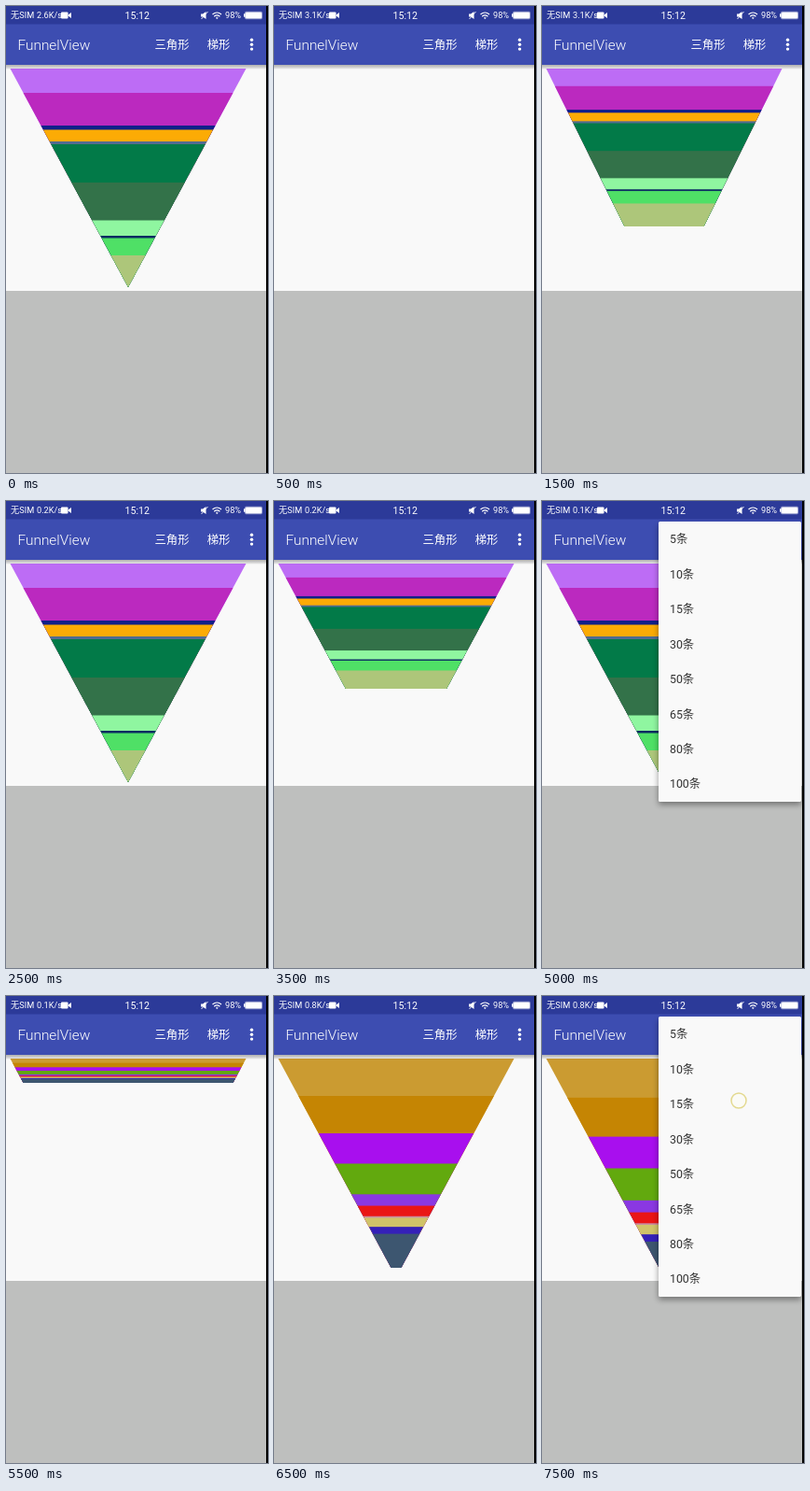
An HTML page for the animation above (8 s loop, 281x500 px).

```html
<!DOCTYPE html>
<html lang="zh">
<head>
<meta charset="utf-8">
<title>FunnelView</title>
<style>
  html, body { margin: 0; height: 100%; overflow: hidden; background: #000; }
  svg { display: block; width: 100vw; height: 100vh; }
  text { font-family: Roboto, "Noto Sans CJK SC", "Noto Sans CJK", sans-serif; font-size: 12.35px; fill: #fff; }
  .light { font-weight: 300; }
  .status text { font-size: 9.2px; }
  #popup text { fill: #333; }
</style>
</head>
<body>
<svg viewBox="0 0 281 500">
  <defs>
    <linearGradient id="fade" x2="0" y2="1">
      <stop stop-opacity=".3"/>
      <stop offset="1" stop-opacity=".06"/>
    </linearGradient>
    <filter id="blur" x="-10%" y="-10%" width="120%" height="120%"><feGaussianBlur stdDeviation="3"/></filter>
    <clipPath id="shape"><polygon id="outline"/></clipPath>
    <clipPath id="screen"><path d="M0 0H279V500H0z"/></clipPath>
  </defs>

  <g clip-path="url(#screen)">
    <path d="M0 0H279V305H0z" fill="#f9f9f9"/>
    <path d="M0 305H279V500H0z" fill="#bebfbe"/>
    <g id="bands" clip-path="url(#shape)"></g>

    <path d="M0 63H279V67.5H0z" fill="url(#fade)"/>
    <path d="M0 19H279V63H0z" fill="#3d4db1"/>
    <path d="M0 0H279V19.5H0z" fill="#2c3a99"/>

    <g class="status">
      <text x="5" y="13.3">无SIM</text>
      <text id="speed" x="33" y="13.3"></text>
      <text x="127.5" y="13.8" style="font-size:10.6px">15:12</text>
      <text x="235" y="13.3">98%</text>
      <g fill="#fff">
        <rect x="59" y="6.5" width="7.5" height="7" rx="1"/>
        <path d="M66.5 9.5L70 7V13L66.5 10.5z"/>
        <path d="M209 8.5H211L214.5 6V14L211 11.5H209z"/>
        <rect x="255" y="8.3" width="1.5" height="3.4"/>
        <rect x="257" y="6.8" width="17" height="6.4" rx=".8"/>
      </g>
      <g fill="none" stroke="#fff">
        <path d="M209.5 14L216.5 6" stroke-width=".9"/>
        <path d="M221.5 9Q226.3 5 231 9M223.2 11.2Q226.3 8.6 229.4 11.2" stroke-width="1.2"/>
        <circle cx="226.3" cy="12.8" r=".7"/>
        <rect x="256.5" y="6.3" width="18" height="7.4" rx="1" stroke-width=".6"/>
      </g>
    </g>

    <text class="light" x="12.5" y="47" style="font-size:15.4px">FunnelView</text>
    <text class="light" x="159.5" y="45.6">三角形</text>
    <text class="light" x="215.7" y="45.6">梯形</text>
    <g fill="#fff">
      <circle cx="263.5" cy="36.3" r="1.7"/>
      <circle cx="263.5" cy="41.2" r="1.7"/>
      <circle cx="263.5" cy="46.1" r="1.7"/>
    </g>

    <g id="popup">
      <rect x="125" y="26" width="153" height="299" opacity=".4" filter="url(#blur)"/>
      <rect x="125" y="22" width="153" height="300" rx="1.5" fill="#f9f9f9"/>
    </g>
    <circle id="touch" r="8" stroke-width="1.5"/>
  </g>
</svg>
<script>
const $ = id => document.getElementById(id);
const TOP = 67, FULL = 234, LEFT = 4.5, RIGHT = 257.5, STEP = 500;

// each band: colour and its lower edge at full height
const violet = [
  ['#bd6cf5', 26], ['#bb29bf', 61], ['#10208a', 65.5], ['#fcab05', 78], ['#536c90', 81],
  ['#027a48', 122], ['#337249', 162.5], ['#8ff6a0', 179], ['#0b2c62', 181.5],
  ['#4fe066', 200], ['#adc67a', FULL]
];
const gold = [
  ['#cb9b31', 41.8], ['#c58503', 83.6], ['#a80fee', 117.5], ['#62a90e', 151.8],
  ['#8a38e2', 164.6], ['#ea1515', 176.3], ['#c98fa0', 178], ['#d0c369', 188.2],
  ['#3520b8', 196], ['#3d5670', FULL]
];

// grown height at each step
const heights = [FULL, 0, 52, 169, FULL, FULL, 26, 134, 224, FULL, FULL, 26, 127, 224, FULL, FULL];
const speeds = ['2.6', '3.1', '0.2', '0.1', '0.8'];
const touches = { 9: [270.5, 39, '#d3d6e6', '#b9b6b0'], 15: [211, 112, '#fbfbf6', '#e3d98f'] };

function add(parent, tag, attrs, text = '') {
  const el = document.createElementNS('http://www.w3.org/2000/svg', tag);
  for (const key in attrs) el.setAttribute(key, attrs[key]);
  el.textContent = text;
  parent.append(el);
}

[5, 10, 15, 30, 50, 65, 80, 100].forEach((n, i) =>
  add($('popup'), 'text', { x: 137, y: 45.3 + i * 37.45 }, n + '条'));

function drawFunnel(bands, height, slope) {
  const bottom = TOP + height, inset = height * slope;
  $('outline').setAttribute('points',
    `${LEFT},${TOP} ${RIGHT},${TOP} ${RIGHT - inset},${bottom} ${LEFT + inset},${bottom}`);
  $('bands').replaceChildren();
  let start = 0;
  for (const [fill, end] of bands) {
    const y = TOP + start * height / FULL;
    add($('bands'), 'rect', { x: 0, y, width: 279, height: bottom - y, fill });
    start = end;
  }
}

function render(step) {
  const trapezoid = step >= 1 && step <= 4;
  drawFunnel(step < 11 ? violet : gold, heights[step], trapezoid ? 0.497 : 126.5 / FULL);
  $('speed').textContent = speeds[Math.floor((step + 3) / 4)] + 'K/s';
  $('popup').style.display = step === 10 || step >= 14 ? '' : 'none';

  const touch = touches[step];
  $('touch').style.display = touch ? '' : 'none';
  if (touch) ['cx', 'cy', 'fill', 'stroke'].forEach((key, i) => $('touch').setAttribute(key, touch[i]));
}

let shown = -1;
function tick() {
  const step = Math.floor(performance.now() / STEP) % heights.length;
  if (step !== shown) render(shown = step);
  requestAnimationFrame(tick);
}
tick();
</script>
</body>
</html>
```
